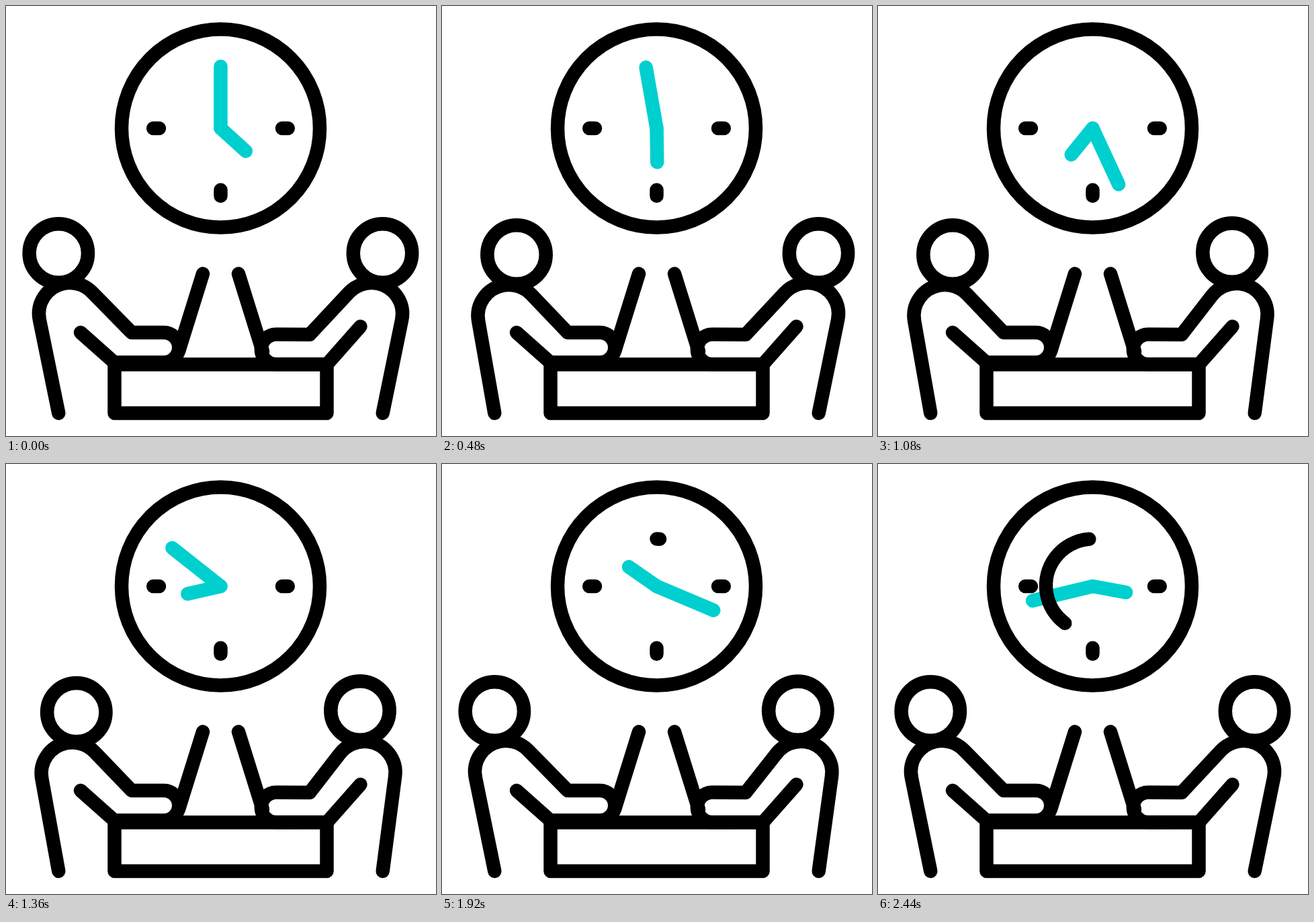
These frames come from a looping animation (640 by 640 pixels, 2480 ms). An HTML page with a canvas:

```html
<!DOCTYPE html>
<html lang="en">
<head>
<meta charset="utf-8">
<title>Meeting time</title>
<style>
  html, body { margin: 0; width: 100%; height: 100%; overflow: hidden; background: #fff; }
  canvas { display: block; width: 640px; height: 640px; }
</style>
</head>
<body>
<canvas id="stage" width="640" height="640"></canvas>
<script>
const ctx = document.getElementById('stage').getContext('2d');
const LOOP = 2480, STEP = 40;
const BLACK = '#000', TEAL = '#00cfcf';
const CX = 319.5, CY = 182;

const rad = deg => deg * Math.PI / 180;
const mix = (a, b, k) => a + (b - a) * k;
const mixPoint = (a, b, k) => [mix(a[0], b[0], k), mix(a[1], b[1], k)];

// Eased progress from 0 to 1 within a time span
function ease(t, start, duration) {
  const u = Math.min(1, Math.max(0, (t - start) / duration));
  return u * u * (3 - 2 * u);
}

function stroke(build, color = BLACK) {
  ctx.beginPath();
  build();
  ctx.strokeStyle = color;
  ctx.stroke();
}

function line(points, color) {
  stroke(() => points.forEach(p => ctx.lineTo(...p)), color);
}

function circle(x, y, r) {
  stroke(() => ctx.arc(x, y, r, 0, 2 * Math.PI));
}

// Angle on a circle where the line from an outside point touches it
function tangentAngle([cx, cy], r, [px, py], side) {
  const dx = px - cx, dy = py - cy;
  return Math.atan2(dy, dx) + side * Math.acos(r / Math.hypot(dx, dy));
}

const left = {
  side: 1, foot: [78.3, 606], elbow: [187, 486],
  head: [[78.3, 368], [111, 370]],
  shoulder: [[95, 458], [99.5, 461]],
  hand: [235, 508.3], wrist: [161, 530.3], arm: [111, 486]
};
const right = {
  side: -1, foot: [560.7, 606], elbow: [452, 489],
  head: [[560.5, 368], [527, 367]],
  shoulder: [[544, 458], [533.5, 459]],
  hand: [402, 511], wrist: [478, 533], arm: [527.5, 477]
};

function drawPerson(p, lean) {
  const r = 46, handR = 22.2;
  const c = mixPoint(...p.shoulder, lean);
  const mirrored = p.side < 0;
  circle(...mixPoint(...p.head, lean), 43.7);
  stroke(() => {
    ctx.moveTo(...p.foot);
    ctx.arc(...c, r, tangentAngle(c, r, p.foot, p.side),
      tangentAngle(c, r, p.elbow, -p.side), mirrored);
    ctx.lineTo(...p.elbow);
    ctx.arc(...p.hand, handR, -Math.PI / 2, Math.PI / 2, mirrored);
    ctx.lineTo(...p.wrist);
    ctx.lineTo(...p.arm);
  });
}

function drawHand(angle, length) {
  const a = rad(angle);
  line([[CX, CY], [CX + length * Math.sin(a), CY - length * Math.cos(a)]], TEAL);
}

function drawClock(t) {
  const a = ease(t, 0, 533), b = ease(t, 667, 910), c = ease(t, 1665, 1018);
  drawHand(360 * (a + b + 2 * c), 92);
  drawHand(132.3 + 48.2 * a + 89.5 * b + 222.3 * c, 50.5);

  circle(CX, CY, 147.5);
  line([[219.2, CY], [228, CY]]);
  line([[411, CY], [419.8, CY]]);
  line([[CX, 273.7], [CX, 282.7]]);

  const from = 360 * ease(t, 2105, 590), to = 360 * ease(t, 1884, 594);
  if (to > from) {
    stroke(() => ctx.arc(CX, 181, 69.5, rad(from - 90), rad(to - 90)));
  }
}

function drawDesk() {
  line([[293, 398.5], [257, 514]]);
  line([[346, 398.5], [382, 514]]);
  stroke(() => ctx.rect(161.5, 533.5, 316, 72.5));
}

function draw(t) {
  ctx.fillStyle = '#fff';
  ctx.fillRect(0, 0, 640, 640);
  ctx.lineWidth = 20.5;
  ctx.lineCap = ctx.lineJoin = 'round';
  drawClock(t);
  drawPerson(left, ease(t, 0, 420) - ease(t, 1204, 560));
  drawPerson(right, ease(t, 500, 390) - ease(t, 1820, 560));
  drawDesk();
}

const began = performance.now();
function tick() {
  const t = (performance.now() - began) % LOOP;
  draw(Math.floor(t / STEP) * STEP);
  requestAnimationFrame(tick);
}
tick();
</script>
</body>
</html>
```
